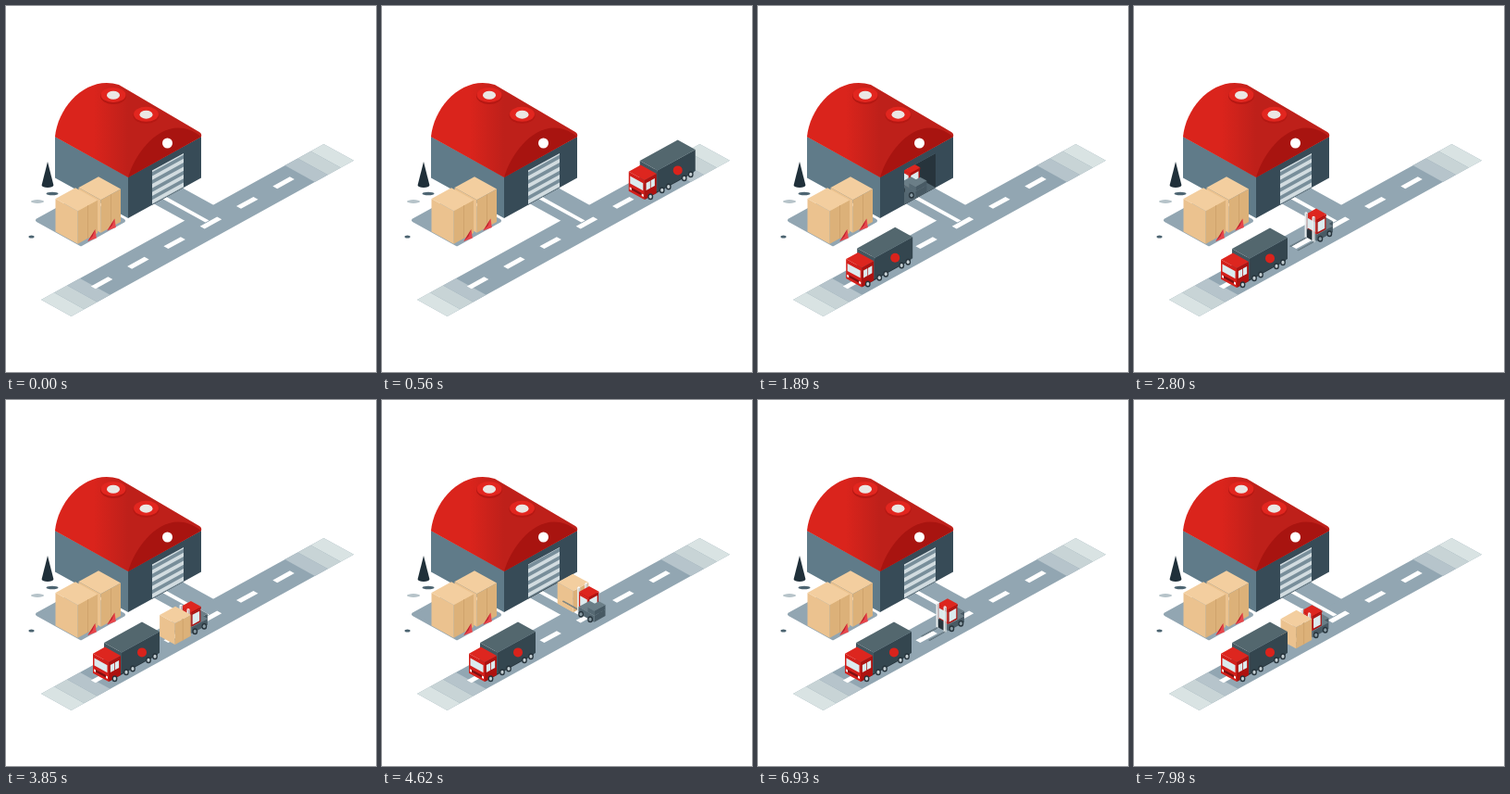
Animation, 400 px wide and 395 px high, one loop 8000 ms. Source, as an HTML page with a canvas:

```html
<!DOCTYPE html>
<html lang="en">
<head>
<meta charset="utf-8">
<title>Warehouse delivery</title>
<style>
  html, body { margin: 0; width: 100%; height: 100%; overflow: hidden; background: #fff; }
  canvas { display: block; width: 400px; height: 395px; }
</style>
</head>
<body>
<canvas id="stage" width="400" height="395"></canvas>
<script>
const ctx = document.getElementById('stage').getContext('2d');
const SLOPE = 0.55, LOOP = 8000, CYCLE = 4200, FIRST_EXIT = 1660;
const DARK = '#27343c', GLASS = '#dcebee', ROAD = '#92a6b2', SEAM = '#cfa36c';

// Colours of a box: top, left side, right side.
const CRATE = ['#f3ce9f', '#ebc28f', '#dcb179'];
const RED = ['#dd261f', '#d31f1a', '#ad1210'];
const STEEL = ['#6b7e87', '#566973', '#485a64'];
const TRAILER = ['#53676e', '#43565f', '#34464f'];
const WALLS = ['#d9231c', '#607b89', '#374b57'];
const MAST = ['#fff', '#e9edee', '#c3cdd1'];
const BLACK = [DARK, DARK, DARK];

// Eased 0..1 progress between two times.
function ease(t, from, to) {
  const u = Math.min(1, Math.max(0, (t - from) / (to - from)));
  return u < 0.5 ? 2 * u * u : 1 - 2 * (1 - u) ** 2;
}

// A view is a ground point with a heading; f runs along it, s to its side.
const view = (x, y, angle = 0) => ({ x, y, hx: Math.cos(angle), hy: Math.sin(angle) });
function project(v, f, s, z) {
  const X = f * v.hx - s * v.hy, Y = f * v.hy + s * v.hx;
  return [v.x + X - Y, v.y + SLOPE * (X + Y) - z];
}

function trace(points) {
  ctx.beginPath();
  points.forEach(([x, y]) => ctx.lineTo(x, y));
  ctx.closePath();
}
function fill(color, path) {
  ctx.fillStyle = color;
  path ? ctx.fill(path) : ctx.fill();
}
function oval(color, x, y, rx, ry = rx) {
  ctx.beginPath();
  ctx.ellipse(x, y, rx, ry, 0, 0, 7);
  fill(color);
}
const span = (middle, width) => [middle - width / 2, middle + width / 2];
const pair = a => Array.isArray(a) ? a : [a, a];

// A flat rectangle: level when z is one number, else upright.
function plate(color, v, f, s, z) {
  const [f0, f1] = pair(f), [s0, s1] = pair(s), [z0, z1] = pair(z);
  const level = z0 === z1;
  trace([
    project(v, f0, s0, z0), project(v, f1, level ? s0 : s1, z0),
    project(v, f1, s1, z1), project(v, f0, level ? s1 : s0, z1)
  ]);
  fill(color);
}

function cuboid(v, f, s, z, colors, glazed) {
  const inner = ([a, b]) => span((a + b) / 2, (b - a) * 0.76);
  const wall = (nx, ny, f, s) => {
    if (nx + ny < 0.01) return;
    plate(colors[ny > nx ? 1 : 2], v, f, s, z);
    if (glazed) plate(GLASS, v, f.map ? inner(f) : f, s.map ? inner(s) : s, inner(z));
  };
  wall(v.hx, v.hy, f[1], s);
  wall(-v.hx, -v.hy, f[0], s);
  wall(-v.hy, v.hx, f, s[1]);
  wall(v.hy, -v.hx, f, s[0]);
  plate(colors[0], v, f, s, z[1]);
}

function wheel(x, y, hub) {
  oval(DARK, x, y, 2.9, 3.5);
  oval(hub, x, y, 1.6, 2);
}

const road = view(38, 317), hall = view(132, 142), yard = view(80, 206);
const ROAD_WIDTH = 32.5, ROAD_LENGTH = 305.5, BAND = 14;
const HALL = 79, DOOR = [19, 53], DOOR_HEIGHT = 37;

function drawRoad() {
  plate(ROAD, hall, [HALL, HALL + 36], [20, 51], 0);
  plate(ROAD, road, [0, ROAD_WIDTH], [-ROAD_LENGTH, 0], 0);
  ['#d9e3e3', '#c8d4d6', '#b6c4cb'].forEach((color, i) => {
    for (const edge of [0, BAND * 5 - ROAD_LENGTH - BAND * 4]) {
      const near = edge ? edge - BAND + i * BAND : -(i + 1) * BAND;
      plate(color, road, [0, ROAD_WIDTH], [near, near + BAND], 0);
    }
  });
  for (let i = 0; i < 6; i++) {
    plate('#fff', road, span(ROAD_WIDTH / 2, 5), span(-49.3 - i * 39.3, 18.5), 0);
  }
  plate('#fff', hall, [HALL, HALL + 46], span(39.5, 4), 0);
}

function drawCone(color, x, base, radius, height, lean = 0) {
  trace([[x - radius, base], [x + lean, base - height], [x + radius, base - lean]]);
  fill(color);
}

function drawYard() {
  plate(ROAD, yard, [0, 47], [0, 46], 0);
  ctx.strokeStyle = ROAD;
  ctx.lineWidth = 4;
  ctx.lineJoin = 'round';
  ctx.stroke();

  oval('#4d6572', 50, 202.5, 6.5, 1.7);
  oval('#b6c3c9', 34, 211, 7, 1.9);
  oval('#4d6572', 27.5, 249, 3, 1.5);
  oval('#20303a', 45, 193.5, 6.3, 2.4);
  drawCone('#20303a', 45, 193, 6.3, 25);
}

function drawPile() {
  for (const v of [view(100, 219.7), view(75, 231.7)]) {
    cuboid(v, [0, 24], [0, 21.5], [0, 35.5], CRATE);
    plate(SEAM, v, 24, span(10.5, 1), [0, 35.5]);
  }
  for (const x of [93, 114]) {
    const base = 254 - (x - 93) * SLOPE;
    drawCone('#e8464b', x, base, 4.8, 13, 3.5);
    drawCone('#b91e2a', x - 2, base, 2.5, 13, 5.5);
  }
}

const ROOF = new Path2D('M53 141C56 108 88 74 122 85L209 136Q212 138 211 141L132 185Z');
const GABLE = new Path2D('M132 185C140 156 174 112 211 141Z');
const roofShade = ctx.createLinearGradient(95, 0, 132, 0);
roofShade.addColorStop(0, '#da241c');
roofShade.addColorStop(1, '#be201a');

function drawHall(doorOpen) {
  cuboid(hall, [0, HALL], [0, HALL], [0, 44.5], WALLS);
  fill(roofShade, ROOF);
  fill('#a81410', GABLE);
  for (const x of [116, 151.5]) {
    const y = 96.5 + (x - 116) * 0.59;
    oval('#b51813', x, y + 0.8, 14, 8.6);
    oval('#e2261f', x, y - 0.6, 13.5, 8);
    oval('#ebe7e4', x, y - 0.3, 7, 4.5);
  }
  oval('#fff', 174.5, 148, 5.5);

  ctx.save();
  plate(DARK, hall, HALL, DOOR, [0, DOOR_HEIGHT]);
  ctx.clip();
  plate('#536670', hall, [HALL - 34, HALL], DOOR, 0);
  const slat = 8.6, bottom = DOOR_HEIGHT * doorOpen;
  plate('#788e9a', hall, HALL, DOOR, [bottom, bottom + DOOR_HEIGHT]);
  for (let z = bottom + 1; z < DOOR_HEIGHT; z += slat) {
    plate('#d2dce0', hall, HALL, DOOR, [z, z + slat / 2]);
  }
  ctx.restore();
}

function drawTruck(t) {
  const away = 205 * (1 - ease(t, 0, 2000));
  const v = view(147 + away, 267.5 - away * SLOPE);
  const nose = 54, flank = 18;
  ctx.globalAlpha = ease(t, 30, 350);
  cuboid(v, [1, flank], [1, nose - 1], [3, 7], BLACK);
  cuboid(v, [0, 19], [0, 41], [5, 28], TRAILER);
  cuboid(v, [1, flank], [41, nose], [3, 24], RED);
  plate(GLASS, v, span(9.5, 14), nose, [12, 20]);
  plate('#7b1113', v, span(9.5, 11), nose, [6, 8.5]);
  for (const f of [3, 16]) plate('#fff', v, span(f, 2), nose, [5.5, 8]);
  for (const s of [45, 50]) plate(GLASS, v, flank, span(s, 4.3), [12, 20]);
  oval('#d9231c', ...project(v, 19, 19, 16), 5);
  for (const s of [47.5, 35, 28, 11, 4]) wheel(...project(v, flank, s, 2.8), '#c5cfd3');
  ctx.globalAlpha = 1;
}

function drawForklift(c) {
  const inside = 80 * (1 - ease(c, 0, 640) + ease(c, 3000, 4200));
  const along = 56 * (ease(c, 715, 1590) - ease(c, 1650, 2650));
  const angle = Math.PI / 2 * (2 - ease(c, 580, 730) + ease(c, 2600, 2900));
  const v = view(226.5 - along - inside, 233.4 + (along - inside) * SLOPE, angle);
  const lift = 2.5 * ease(c, 1540, 1680);

  const parts = [];
  const add = (f, s, z, draw) => parts.push({ depth: f * (v.hx + v.hy) + s * (v.hx - v.hy) + z * 0.3, draw });
  const middle = ([a, b]) => (a + b) / 2;
  const block = (f, s, z, colors, glazed) =>
    add(middle(f), middle(s), middle(z), () => cuboid(v, f, s, z, colors, glazed));

  block([-9, 8], [-6, 6], [2, 9], STEEL);
  block([-9, -2], [-6, 6], [9, 14], STEEL);
  block([-2, 8], [-5.5, 5.5], [9, 23], RED, true);
  block([-2.5, 8], [-5.5, 5.5], [23, 25], RED);
  block([9, 10], [-3, 3], [2 + lift, 11 + lift], BLACK);
  for (const s of [-4, 4]) {
    block([9, 10.5], span(s, 1.8), [1, 28], MAST);
    block([10, 27], span(s, 1), [1 + lift, 1.6 + lift], STEEL);
  }
  for (const f of [-5, 5]) for (const s of [-6.4, 6.4]) {
    add(f, s, 3, () => wheel(...project(v, f, s, 3), '#8799a2'));
  }
  if (c > 1620) add(20, 0, 14, () => {
    cuboid(v, span(20, 17), span(0, 16.6), [lift, 23 + lift], CRATE);
    if (v.hy > 0.9) plate(SEAM, v, span(20, 1), -8.3, [lift, 23 + lift]);
  });

  ctx.save();
  if (inside > 0) {
    // The door frame hides whatever is already indoors.
    const [x, y] = project(hall, HALL, DOOR[1], DOOR_HEIGHT);
    trace([[x, y], project(hall, HALL, -90, DOOR_HEIGHT), [300, 300], [x, 300]]);
    ctx.clip();
  }
  parts.sort((a, b) => a.depth - b.depth).forEach(part => part.draw());
  ctx.restore();
}

function render() {
  const t = performance.now() % LOOP, started = t >= FIRST_EXIT;
  const c = (t - FIRST_EXIT) % CYCLE;
  const doorOpen = started
    ? 1 - ease(c, 640, 1040) + ease(c, 2900, 3400)
    : ease(t, 620, 1330);

  ctx.fillStyle = '#fff';
  ctx.fillRect(0, 0, 400, 395);
  drawRoad();
  drawYard();
  drawHall(doorOpen);
  drawPile();
  if (started) drawForklift(c);
  drawTruck(t);
  requestAnimationFrame(render);
}
render();
</script>
</body>
</html>
```
